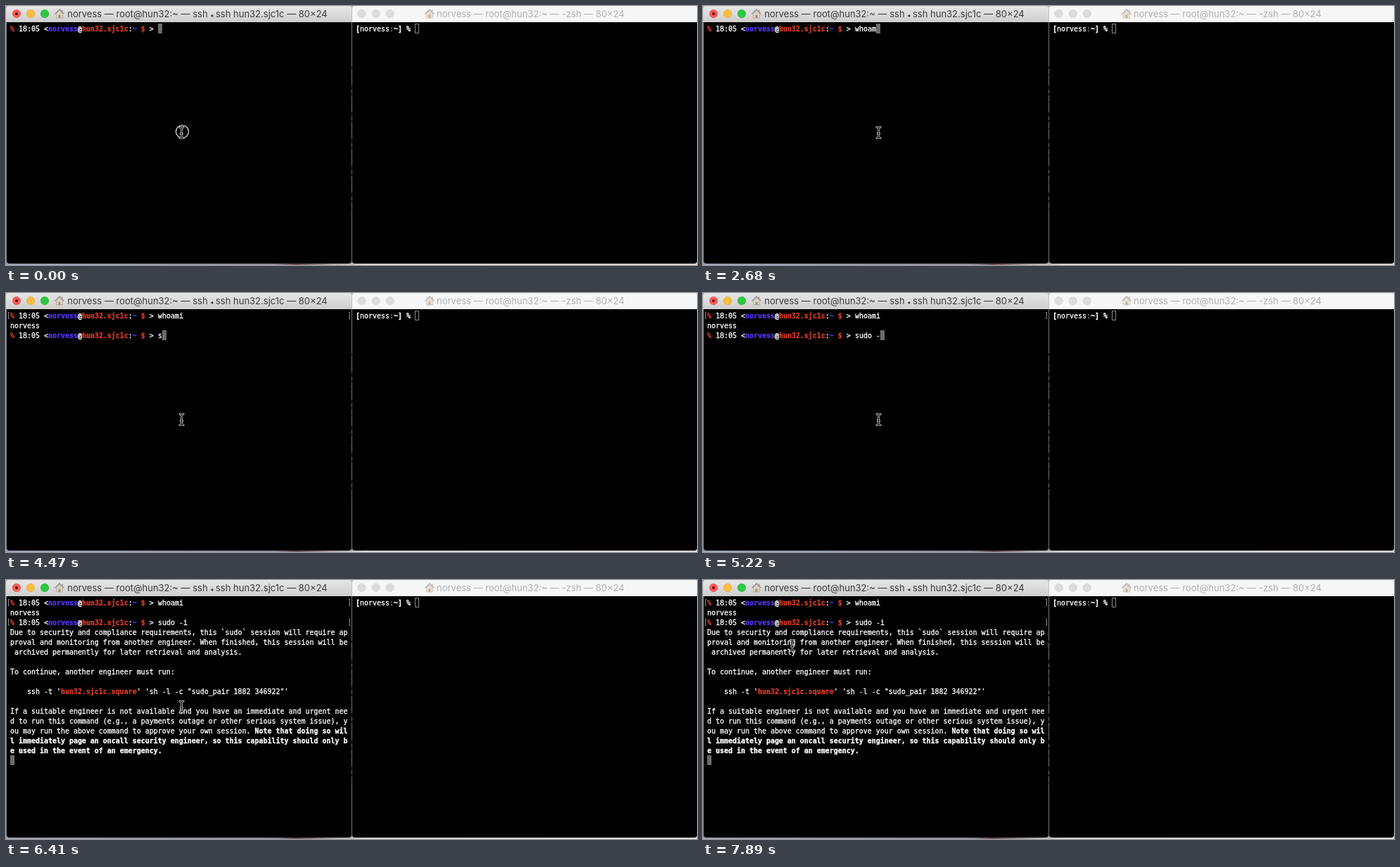
These frames come from a looping animation (982 by 368 pixels, 8000 ms). An HTML page:

```html
<!DOCTYPE html>
<html lang="en">
<head>
<meta charset="utf-8">
<title>Terminal session</title>
<style>
  html, body { margin: 0; width: 100%; height: 100%; overflow: hidden; background: #000; }
  svg { display: block; width: 982px; height: 368px; }
  .term { font: 9.966px "DejaVu Sans Mono", monospace; white-space: pre; --ink: #fff; }
  .term text { white-space: pre; }
  .term text, .term tspan { fill: var(--ink); stroke: var(--ink); stroke-width: .3px; }
  .bold, .red, .blue { font-weight: bold; }
  .red { --ink: #d83a24; }
  .blue { --ink: #5433f0; }
  .dim { --ink: #7d9a6d; }
  .title { font: 13px Inter, sans-serif; text-anchor: middle; }
  .small { font-size: 8px; }
  .mark { fill: none; stroke: #8c8c8c; }
</style>
</head>
<body>
<svg viewBox="0 0 982 368" xmlns="http://www.w3.org/2000/svg">
  <defs>
    <linearGradient id="bar" x2="0" y2="1">
      <stop stop-color="#e7e6e7"/><stop offset="1" stop-color="#cfcecf"/>
    </linearGradient>
    <linearGradient id="desk">
      <stop stop-color="#9aa3b5"/><stop offset=".39" stop-color="#8d8b9b"/>
      <stop offset=".42" stop-color="#6b4a50"/><stop offset=".47" stop-color="#a9a3a8"/>
      <stop offset=".52" stop-color="#d8d2d2"/><stop offset="1" stop-color="#dcd6d5"/>
    </linearGradient>
    <g id="house">
      <path d="M2.5 7 7 2.5 11.5 7V13H2.5Z" fill="#ddd5c9" stroke="#aaa095" stroke-width=".7"/>
      <path d="M.5 7.5 7 1 13.5 7.5" fill="none" stroke="#958b84" stroke-width="1.3"/>
      <path d="M5.5 13V8.5H8.5V13Z" fill="#a98c70"/>
      <path d="M10 1.5h1.5v3L10 3Z" fill="#a3948a"/>
    </g>
    <path id="ibeam" d="M-2.8-7.8Q0-7.8 0-5V5Q0 7.8-2.8 7.8M2.8-7.8Q0-7.8 0-5M0 5Q0 7.8 2.8 7.8M-1.5 1.5H1.5"
          fill="none" stroke-linecap="round"/>
  </defs>

  <rect width="982" height="368" fill="url(#desk)"/>
  <path d="M0 22H491V362Q491 366 487 366H5Q1 366 1 362V22Z"/>
  <path d="M492 22H982V362Q982 366 978 366H496Q492 366 492 362Z"/>
  <path d="M.5 23V366" stroke="#76868f"/>
  <path d="M491.5 23V366" stroke="#72787d"/>
  <path d="M491.5 86V300" stroke="#262626" stroke-dasharray="3 9 1 14 6 5"/>

  <path d="M0 23V4Q0 0 4 0H487Q491 0 491 4V23Z" fill="url(#bar)"/>
  <path d="M492 23V4Q492 0 496 0H978Q982 0 982 4V23Z" fill="#f6f6f6"/>
  <g id="lights"></g>
  <use href="#house" x="69" y="4"/>
  <use href="#house" x="595" y="4" opacity=".65"/>
  <text class="title" id="leftTitle" x="272" y="16" fill="#3a3a3a"></text>
  <text class="title" id="rightTitle" x="745.5" y="16" fill="#b1b1b1"></text>

  <g class="term" id="term"></g>
  <path class="mark" d="M581.5 25.5h5v13h-5Z"/>
  <rect id="caret" width="6" height="14" fill="#6b6b6b"/>

  <circle id="ring" cx="250.5" cy="178.5" r="9" stroke="#fff" stroke-width="1.1"/>
  <g id="pointer">
    <use href="#ibeam" stroke="#f4f4f4" stroke-width="2.4"/>
    <use href="#ibeam" stroke="#000" stroke-width="1.1"/>
  </g>
</svg>

<script>
const LOOP = 8000, COL = 6, ROW = 14, LEFT = 6, TOP = 25;
const USER = "norvess", HOST = "hun32.sjc1c";
const $ = id => document.getElementById(id);

function add(parent, tag, attrs = {}, text = "") {
  const el = document.createElementNS("http://www.w3.org/2000/svg", tag);
  for (const key in attrs) el.setAttribute(key, attrs[key]);
  el.textContent = text;
  return parent.appendChild(el);
}

// Text is a string or a list of strings and [style, string] pairs.
function fill(text, parts) {
  for (const part of [].concat(parts)) {
    const [style, str] = Array.isArray(part) ? part : ["", part];
    add(text, "tspan", { class: style }, str);
  }
  return text;
}

const line = (parent, row, parts, x = LEFT) =>
  fill(add(parent, "text", { x, y: TOP + row * ROW + 11 }), parts);

const show = (el, on) => el.setAttribute("visibility", on ? "visible" : "hidden");

const prompt = [["red", "%"], " 18:05 <", ["blue", USER], ["bold", "@"], ["red", HOST], ":",
                ["blue", "~"], " ", ["red", "$"], " > "];
const promptLength = 35;

const notice = [
  "Due to security and compliance requirements, this `sudo` session will require ap",
  "proval and monitoring from another engineer. When finished, this session will be",
  " archived permanently for later retrieval and analysis.",
  "",
  "To continue, another engineer must run:",
  "",
  ["    ssh -t '", ["red", HOST + ".square"], "' 'sh -l -c \"sudo_pair 1882 346922\"'"],
  "",
  "If a suitable engineer is not available and you have an immediate and urgent nee",
  "d to run this command (e.g., a payments outage or other serious system issue), y",
  ["ou may run the above command to approve your own session. ", ["bold", "Note that doing so wil"]],
  [["bold", "l immediately page an oncall security engineer, so this capability should only b"]],
  [["bold", "e used in the event of an emergency."]]
];

const typing = [
  { row: 0, start: 0, enter: 2970, done: 3120,
    keys: [[0, ""], [1800, "w"], [2090, "wh"], [2240, "who"], [2540, "whoa"], [2680, "whoam"], [2830, "whoami"]] },
  { row: 2, start: 3120, enter: 6270, done: 6410,
    keys: [[3120, ""], [4470, "s"], [4770, "su"], [4920, "sud"], [5070, "sudo "], [5220, "sudo -"], [5670, "sudo -i"]] }
];

const pointerPath = [
  [0, 249.5, 180], [6860, 215, 150], [7010, 130, 92], [7150, 48, 54], [7300, 6, 44],
  [7450, 4, 58], [7600, 24, 74], [7740, 78, 86], [7890, 127, 93]
];

const at = (steps, t) => steps.filter(step => step[0] <= t).pop();

fill($("leftTitle"), [`${USER} — root@hun32:~ — ssh `, ["small", "◂"], ` ssh ${HOST} — 80×24`]);
fill($("rightTitle"), `${USER} — root@hun32:~ — -zsh — 80×24`);

const light = (cx, fill, stroke) => add($("lights"), "circle", { cx, cy: 11, r: 5.7, fill, stroke, "stroke-width": .6 });
light(15, "#fc5b57", "#df4744");
light(35, "#fdbd3e", "#de9f34");
light(55, "#2bc840", "#22a932");
add($("lights"), "circle", { cx: 15, cy: 11, r: 2, fill: "#5c0a08" });
for (const x of [505.5, 525.7, 545.7]) light(x, "#dcdcdc", "#d0d0d0");

const term = $("term");
line(term, 0, [["bold", "["], USER, ["dim", ":"], ["bold", "~]"], " ", ["bold", "%"]], 497);

for (const cmd of typing) {
  const y = TOP + cmd.row * ROW;
  cmd.group = add(term, "g");
  line(cmd.group, cmd.row, prompt);
  cmd.text = add(cmd.group, "text", { x: LEFT + promptLength * COL, y: y + 11 });
  cmd.marks = add(term, "path", { class: "mark", d: `M5 ${y + 2.5}H3.5v9H5M487 ${y + 2.5}h1.5v9H487` });
}
const answer = line(term, 1, USER);
const noticeGroup = add(term, "g");
notice.forEach((parts, i) => line(noticeGroup, 3 + i, parts));

function draw(t) {
  let row = 16, col = 0;
  for (const cmd of typing) {
    const typed = (at(cmd.keys, t) || [0, ""])[1];
    cmd.text.textContent = typed;
    show(cmd.group, t >= cmd.start);
    show(cmd.marks, t >= cmd.enter);
    if (t >= cmd.start && t < cmd.done) {
      row = cmd.row;
      col = promptLength + typed.length;
    }
  }
  show(answer, t >= typing[0].done);
  show(noticeGroup, t >= typing[1].done);
  show($("ring"), t < 150);
  $("caret").setAttribute("x", LEFT + col * COL);
  $("caret").setAttribute("y", TOP + row * ROW);
  const [, x, y] = at(pointerPath, t);
  $("pointer").setAttribute("transform", `translate(${x} ${y})`);
}

const began = performance.now();
function tick() {
  draw((performance.now() - began) % LOOP);
  requestAnimationFrame(tick);
}
tick();
</script>
</body>
</html>
```
